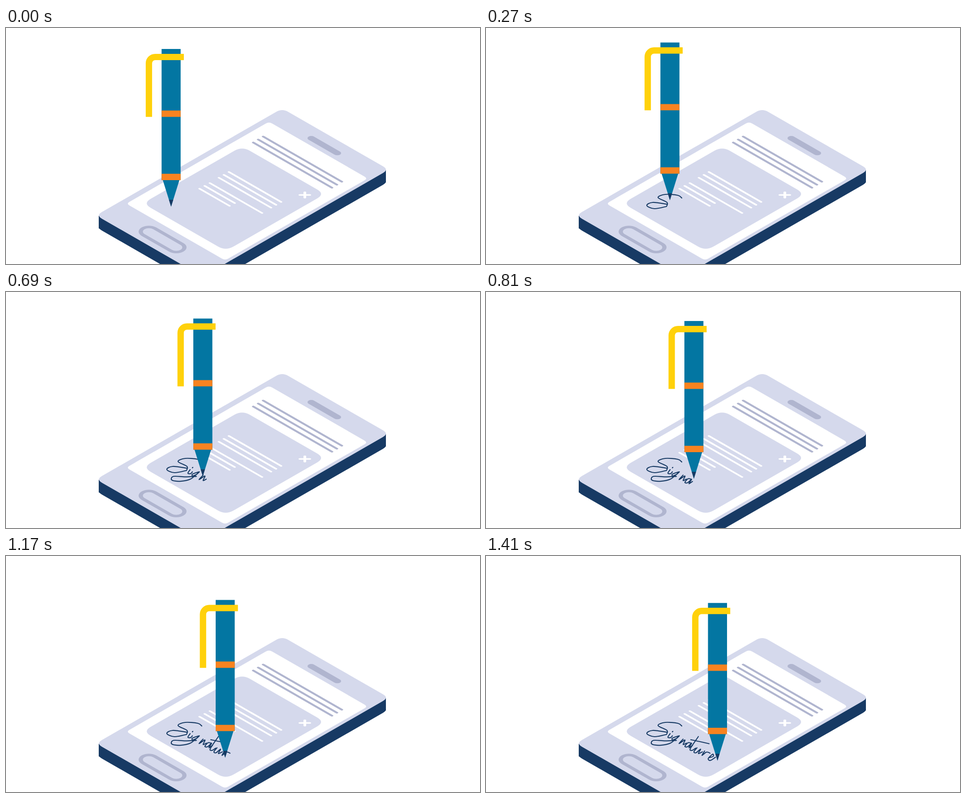
Animation of 1058x529 px, one loop 2310 ms. Source, as an HTML page:

```html
<!DOCTYPE html>
<html lang="en">
<head>
<meta charset="utf-8">
<title>Signing on a phone</title>
<style>
  html, body { margin: 0; width: 100%; height: 100%; overflow: hidden; background: #fff; }
  svg { display: block; width: 100%; height: 100%; }
  .line { fill: none; stroke-linecap: round; stroke-linejoin: round; }
</style>
</head>
<body>
<svg viewBox="0 0 1058 529">
  <g id="phone"></g>
  <g id="marks" class="line" transform="scale(1 .577)"></g>
  <g id="ink" class="line" stroke="#173a64" stroke-width="2.2"></g>
  <g id="pen">
    <path fill="#0376a2" d="M347.3 47H389.8V341H387L368.5 400.5L350 341H347.3Z"/>
    <path fill="#f88320" d="M347.3 185h42.5v14.2h-42.5zM347.3 326.8h42.5v14.2h-42.5z"/>
    <path fill="#173a64" d="M363.7 385h9.6L368.5 400.5Z"/>
    <path fill="none" stroke="#ffd10b" stroke-width="14.2" d="M397 65H333A14 14 0 0 0 319 79V199.2"/>
  </g>
</svg>
<script>
const ISO = 0.577;
const FACE = '#d5d9ec', GREY = '#b0b5cf', NAVY = '#173a64', WHITE = '#fff';
const byId = id => document.getElementById(id);

function addPath(parent, d, attrs = {}) {
  const path = document.createElementNS('http://www.w3.org/2000/svg', 'path');
  path.setAttribute('d', d);
  for (const key in attrs) path.setAttribute(key, attrs[key]);
  return byId(parent).appendChild(path);
}

// Isometric panel from its left corner; `long` and `short` are the sides' widths on screen.
function panel(x, y, long, short, cut) {
  const corners = [[0, 0], [long, 0], [long, short], [0, short]]
    .map(([a, b]) => [x + a + b, y + (b - a) * ISO]);
  const toward = ([px, py], [qx, qy]) => {
    const k = cut / Math.hypot(qx - px, qy - py);
    return [px + (qx - px) * k, py + (qy - py) * k];
  };
  return corners.map((p, i) => {
    const from = toward(p, corners[(i + 3) % 4]);
    const to = toward(p, corners[(i + 1) % 4]);
    return `${i ? 'L' : 'M'}${from}Q${p} ${to}`;
  }).join('') + 'Z';
}

// Line along the phone's short side, drawn in the tilted plane.
function bar(x, y, length, width, stroke) {
  addPath('marks', `M${x} ${y / ISO}l${length} ${length}`, { stroke, 'stroke-width': width });
}

const body = panel(201, 420, 415.5, 238, 15);
addPath('phone', body, { fill: NAVY, transform: 'translate(0 26.5)' });
addPath('phone', 'M207 421L848 318V346L439 580L207 449Z', { fill: NAVY });
addPath('phone', body, { fill: FACE });
addPath('phone', panel(268.5, 393.7, 318.5, 220.5, 8), { fill: WHITE });
addPath('phone', panel(305.5, 393, 221.5, 185, 20), { fill: FACE });

bar(681.5, 247, 58, 17, GREY);
bar(319, 456.5, 61, 46, GREY);
bar(319, 456.5, 61, 27, FACE);
for (let i = 0; i < 3; i++) {
  bar(574 - 11 * i, 243.3 + 6.7 * i, 175.5, 6, GREY);
  bar(497.5 - 11.2 * i, 322.7 + 6.4 * i, 116.5, 5.3, WHITE);
  bar(455 - 11.5 * i, 347.5 + 6.3 * i, i ? 67 : 116.5, 5.3, WHITE);
}
addPath('marks', `M656 ${374.3 / ISO}h22m-11 -10.5v21`, { stroke: WHITE, 'stroke-width': 6 });

// Key points of each letter, relative to its place on the baseline.
const WORD = 'Signature';
const glyphs = {
  S: ['42,-18 33,-24 5,-26 -11,-19 9,-8 8,1', '8,1 -19,6 -36,-1 -23,-8 9,-4'],
  i: ['3,-8 -2,0 4,1 8,-3', '8,-12 9,-13'],
  g: ['9,-10 -5,-5 -4,-1 5,-5 10,-10 -9,6 -33,11 -51,8 -47,0 -21,1 4,0'],
  n: ['6,-10 -3,0 10,-8 6,2 13,-1'],
  a: ['11,-8 4,-9 -3,-1 3,0 12,-8 6,2 14,-3'],
  t: ['14,-30 -4,-3 0,1 8,-4', '-3,-23 16,-19 38,-14'],
  u: ['-2,-12 -9,-3 -4,-1 6,-9 1,1 10,-3'],
  r: ['2,-12 -4,-2 5,-9 10,-9 14,-7'],
  e: ['-2,-4 8,-7 7,-12 -3,-2 2,2 13,-5']
};

// Smooth curve through all points.
function curve(text) {
  const pts = text.split(' ').map(pair => pair.split(',').map(Number));
  const at = i => pts[Math.max(0, Math.min(i, pts.length - 1))];
  const handle = (i, side) => at(i).map((v, k) => v + side * (at(i + 1)[k] - at(i - 1)[k]) / 6);
  return `M${pts[0]}` + pts.slice(1)
    .map((p, i) => `C${handle(i, 1)} ${handle(i + 1, -1)} ${p}`).join('');
}

const letters = [...WORD].map((letter, i) => addPath('ink', glyphs[letter].map(curve).join(''), {
  transform: `translate(${395 + 13 * i} ${399 + 7.15 * i})`
}));

// How long each pose is held; the pen pauses once in the middle and at the end.
const holds = [120, 150, 110, 110, 200, ...Array(6).fill(120), 900];
const loop = holds.reduce((sum, ms) => sum + ms);

// Letters finished at each pose.
const written = ['', '', 'S', 'Si', 'Sig', 'Sign', 'Signa', 'Signatu', 'Signatu', 'Signatur', 'Signatur', WORD];

// Pen offsets at key poses: [pose, x, y]; those between are evenly spaced.
const penKeys = [[0, 0, 0], [2, 42, -14.6], [4, 53, 13.4], [5, 70.8, 12.4], [7, 120.2, 23.7], [9, 120.7, 51.6], [11, 148.2, 58.2]];

function penAt(pose) {
  const next = Math.max(1, penKeys.findIndex(([key]) => key >= pose));
  const [p0, x0, y0] = penKeys[next - 1], [p1, x1, y1] = penKeys[next];
  const k = (pose - p0) / (p1 - p0);
  return [x0 + (x1 - x0) * k, y0 + (y1 - y0) * k];
}

function draw() {
  let time = performance.now() % loop, pose = 0;
  while (time >= holds[pose]) time -= holds[pose++];
  byId('pen').setAttribute('transform', `translate(${penAt(pose)})`);
  letters.forEach((path, i) =>
    path.setAttribute('visibility', i < written[pose].length ? 'visible' : 'hidden'));
  requestAnimationFrame(draw);
}
draw();
</script>
</body>
</html>
```
